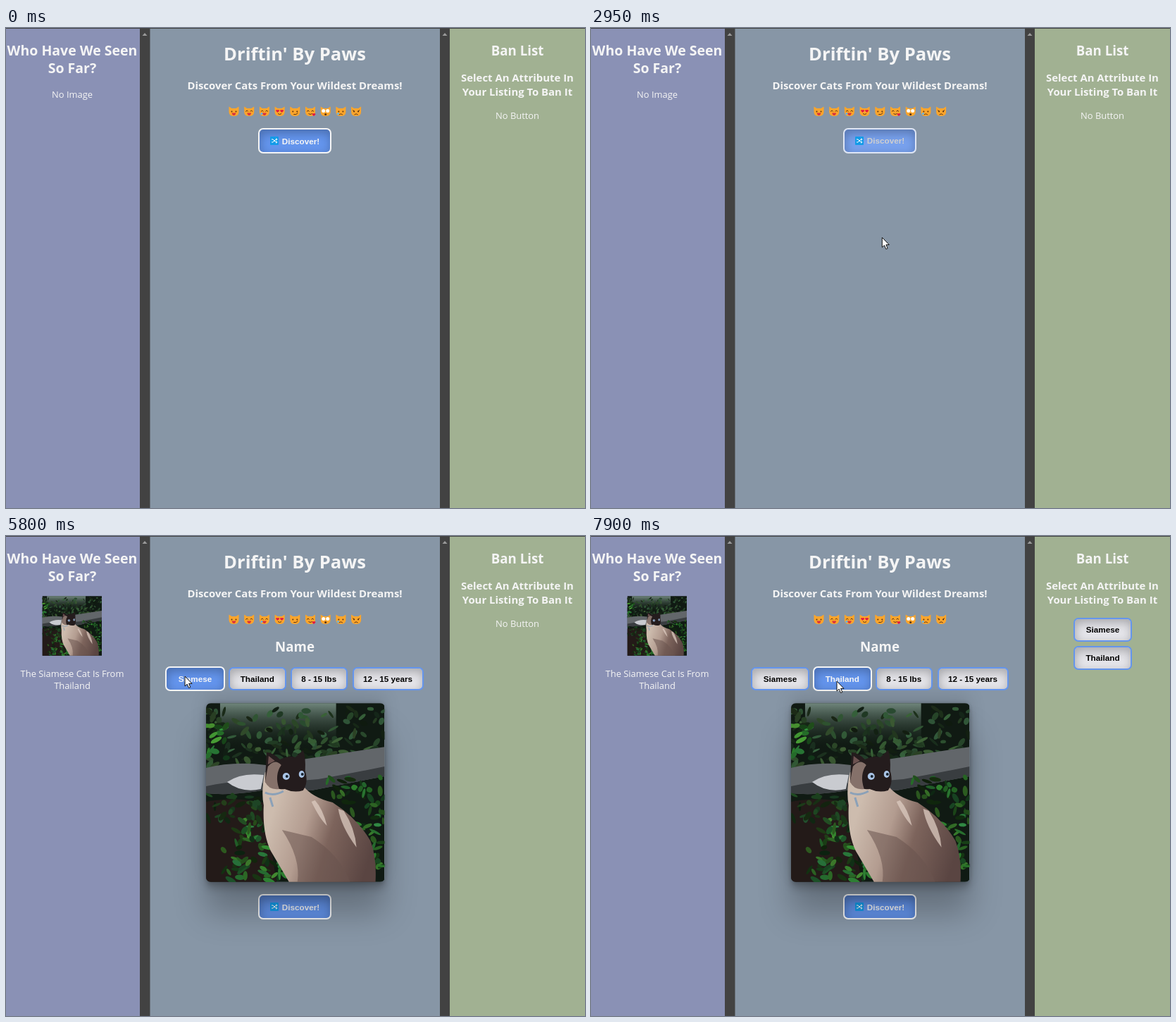
Animation, 822 px wide and 681 px high, one loop 8000 ms. Source, as an HTML page:

```html
<!DOCTYPE html>
<html lang="en">
<head>
<meta charset="utf-8">
<title>Cat discovery</title>
<style>
html, body { margin: 0; width: 100%; height: 100%; overflow: hidden; background: #8796a6; }
svg, .btn, #photo { position: absolute; }
#page { left: 0; top: 0; }
text { font-family: "Open Sans", "Noto Sans", sans-serif; fill: #f5f5f5; text-anchor: middle; }
.h { font-weight: 700; }
.btn {
  box-sizing: border-box; display: flex; align-items: center; justify-content: center; gap: 5px;
  border: 2px solid; border-radius: 7px; white-space: nowrap;
  font: 700 11.7px "Liberation Sans", Arial, sans-serif;
  box-shadow: inset 1px 5px 14px rgba(0, 0, 0, .27);
}
.btn svg { position: static; }
#photo {
  left: 284px; top: 237px; width: 253.5px; height: 254px; border-radius: 7px;
  box-shadow: rgba(0,0,0,.25) 0 44px 45px, rgba(0,0,0,.12) 0 -10px 24px, rgba(0,0,0,.12) 0 3px 5px,
    rgba(0,0,0,.17) 0 10px 11px, rgba(0,0,0,.09) 0 -2px 4px;
}
#photo svg { width: 100%; height: 100%; border-radius: 7px; }
</style>
</head>
<body>
<svg id="page" width="822" height="681">
  <defs>
    <linearGradient id="fur" x1="0" y1=".3" x2="1" y2=".6">
      <stop offset=".1" stop-color="#cdbcae"/><stop offset=".4" stop-color="#b39c90"/>
      <stop offset=".62" stop-color="#7d645c"/><stop offset="1" stop-color="#5a4542"/>
    </linearGradient>
    <linearGradient id="haze" x1="0" y1="0" x2="0" y2="1">
      <stop offset="0" stop-color="#6f857b"/><stop offset="1" stop-color="#1b2c20" stop-opacity="0"/>
    </linearGradient>
    <symbol id="cat" viewBox="0 0 254 254">
      <rect width="254" height="254" fill="#101a13"/>
      <rect x="20" width="165" height="62" fill="url(#haze)"/>
      <g id="ivy"></g>
      <path d="M0 92Q40 82 85 88L150 78Q200 70 254 62V104Q200 114 150 124L90 122Q40 132 0 128Z" fill="#62666a"/>
      <path d="M0 118Q45 108 85 114L160 108Q205 100 254 90V104Q200 114 150 124L90 122Q40 132 0 128Z" fill="#393d40"/>
      <path d="M30 112Q50 98 82 102L78 122Q50 128 30 112Z" fill="#c9cbd0"/>
      <path d="M0 140Q40 132 84 142L100 254H0Z" fill="#231a18"/>
      <g id="bush"></g>
      <path d="M84 98Q78 125 82 145Q80 185 92 210Q105 232 118 254H241Q243 220 234 196Q216 164 180 141Q150 134 137 116Z" fill="url(#fur)"/>
      <path d="M108 180Q135 220 130 254H205Q190 215 150 190Z" fill="#6b544f" opacity=".55"/>
      <path d="M188 150Q192 175 214 205Q212 178 196 153ZM150 140Q162 165 172 174Q166 150 155 138Z" fill="#dccbc0" opacity=".75"/>
      <path d="M84 112L86 70Q95 70 105 80Q118 74 127 77L138 67Q142 76 141 96Q146 113 138 124Q125 128 112 122Q95 124 84 112Z" fill="#241c1d"/>
      <path d="M88 90Q98 78 107 88Q97 102 104 122Q90 124 84 112Z" fill="#85716a"/>
      <path d="M88 87L89 75L98 82Z" fill="#6c5250"/>
      <path d="M84 127Q96 133 110 125M91 134L95 147" fill="none" stroke="#8ba1b8" stroke-width="3"/>
      <g fill="#a9c4e6"><ellipse cx="114" cy="104" rx="5" ry="5"/><ellipse cx="136" cy="101" rx="4" ry="5"/></g>
      <g fill="#17232f"><circle cx="115" cy="104" r="2"/><circle cx="137" cy="101" r="2"/></g>
    </symbol>
  </defs>
  <rect width="822" height="681" fill="#424242"/>
  <path d="M0 1H190V681H0Z" fill="#8a91b5"/>
  <path d="M204.5 1H616V681H204.5Z" fill="#8796a6"/>
  <path d="M630 1H822V681H630Z" fill="#a1b192"/>
  <path d="M193.5 11L197 7L200.5 11ZM619.500 11L623 7L626.500 11Z" fill="#9a9a9a"/>
  <g class="h" font-size="19.500">
    <text x="94" y="39">Who Have We Seen</text>
    <text x="94" y="64">So Far?</text>
    <text x="726" y="39" font-size="18.700">Ban List</text>
    <text x="410" y="164" font-size="18.700" data-show="3770 8000">Name</text>
    <text x="410" y="46" font-size="25.600">Driftin' By Paws</text>
  </g>
  <g class="h" font-size="14.900">
    <text x="410" y="87">Discover Cats From Your Wildest Dreams!</text>
    <text x="726" y="76">Select An Attribute In</text>
    <text x="726" y="95.500">Your Listing To Ban It</text>
  </g>
  <g font-size="12.900">
    <text x="94" y="99" data-show="0 3770">No Image</text>
    <text x="726" y="128.500" data-show="0 6130">No Button</text>
    <g data-show="3770 8000">
      <text x="94" y="200">The Siamese Cat Is From</text>
      <text x="94" y="217">Thailand</text>
    </g>
  </g>
  <g id="faces"></g>
  <use href="#cat" x="51.500" y="85" width="84.500" height="85" data-show="3970 8000"/>
</svg>
<div id="photo" data-show="3770 8000"><svg data-show="3970 8000"><use href="#cat" width="253.500" height="254"/></svg></div>
<svg id="cursor" width="14" height="20" style="left:0;top:0;overflow:visible">
  <path d="M0 0V14L3.200 11.200L5.500 16.500L7.800 15.500L5.600 10.400H10Z" fill="#fff" stroke="#111" stroke-width="1"/>
</svg>
<script>
const $ = id => document.getElementById(id);
const clamp = v => Math.max(0, Math.min(1, v));
const ramp = (t, a, b) => clamp((t - a) / (b - a));
const mix = (a, b, u) => `rgb(${a.map((v, i) => v + (b[i] - v) * u)})`;

// Foliage
let seed = 7;
const rnd = (a, b) => a + (b - a) * ((seed = seed * 16807 % 2147483647) / 2147483647);
const leaves = (n, x0, y0, x1, y1, sat, light) => {
  let s = '';
  for (let i = 0; i < n; i++) {
    const x = rnd(x0, x1), y = rnd(y0, y1);
    s += `<ellipse cx="${x}" cy="${y}" rx="${rnd(4, 9)}" ry="${rnd(1.5, 4)}" transform="rotate(${rnd(0, 180)} ${x} ${y})"
      fill="hsl(${rnd(105, 135)} ${sat}% ${rnd(8, light)}%)"/>`;
  }
  return s;
};
$('ivy').innerHTML = leaves(170, 0, 8, 254, 95, 28, 30) + leaves(14, 0, 25, 32, 80, 50, 42);
$('bush').innerHTML = leaves(70, 25, 165, 115, 254, 48, 38) + leaves(30, 0, 130, 80, 170, 40, 24)
  + leaves(100, 165, 105, 254, 235, 48, 36);

// Row of cat faces: [eyes, mouth, extra]
const dots = '<circle cx="-3" r="1"/><circle cx="3" r="1"/>';
const line = (d, c = '#5a3312') => `<path d="${d}" fill="none" stroke="${c}"/>`;
const heart = (x, y) => `<path transform="translate(${x} ${y})" d="M0 2.500L-2.500 0Q-2-2.500 0-1Q2-2.500 2.500 0Z" fill="#e3173e"/>`;
const grin = '<path d="M-3 2H3Q2 5.500 0 5.500T-3 2Z" fill="#d9323c"/>';
const shut = line('M-5 0L-3-1.500L-1.500 0M1.500 0L3-1.500L5 0');
const smile = line('M-2.500 3Q0 5 2.500 3');
const frown = line('M-2.500 4.500Q0 2 2.500 4.500');
const tear = '<circle cx="-4" cy="3" r="1.500" fill="#5bb5ee"/>';
$('faces').innerHTML = [
  dots + grin, shut + grin, shut + grin + tear, heart(-3, -1) + heart(3, -1) + smile,
  dots + line('M-2 4Q2 5 4 2'), shut + smile + heart(5, 4),
  '<g fill="#fff"><circle cx="-3" cy="-1" r="2.500"/><circle cx="3" cy="-1" r="2.500"/></g><circle cy="4" r="1.500"/>',
  dots + frown + tear, line('M-5-2L-2 0M5-2L2 0') + dots + frown
].map((face, i) => `<g transform="translate(${323.5 + 21.7 * i} 118.500)" fill="#5a3312">
  <path d="M-7-7L-3-4.500H3L7-7V1Q6.500 6.500 0 6.500T-7 1Z" fill="#fba52c"/>${face}</g>`).join('');

// Buttons
const SILVER = [229, 229, 234], BLUE = [100, 149, 237], WHITE = [245, 245, 245], BLACK = [0, 0, 0], DIM = [178, 180, 190];
const shuffle = `<svg width="12" height="12"><rect width="12" height="12" rx="1" fill="#139be8"/>
  <path d="M2 4H4L8 8H10M2 8H4L8 4H10M8.500 2.500L10 4L8.500 5.500M8.500 6.500L10 8L8.500 9.500" fill="none" stroke="#fff"/></svg>`;
const button = (label, x, y, w, h, show) => {
  const el = document.createElement('div');
  el.className = 'btn';
  el.innerHTML = label;
  if (show) el.dataset.show = show;
  $('photo').before(el);
  // Blue fill with a white rim at u = 1, silver with a blue rim at u = 0
  return (u, dy = 0, dim = 0, opacity = 1) => {
    const inset = 1 - u;
    Object.assign(el.style, {
      left: x + inset + 'px', top: y + dy + inset + 'px',
      width: w - 2 * inset + 'px', height: h - 2 * inset + 'px',
      backgroundColor: mix(SILVER, BLUE, u), borderColor: mix(BLUE, WHITE, u),
      color: dim ? mix(WHITE, DIM, dim) : mix(BLACK, WHITE, u), opacity
    });
  };
};
const listed = '3770 8000';
const discover = button(shuffle + 'Discover!', 358, 142, 104, 36);
const breed = button('Siamese', 226, 185, 85, 35, listed);
const origin = button('Thailand', 314.5, 185, 84.5, 35, listed);
button('8 - 15 lbs', 402.5, 185, 83.5, 35, listed)(0);
button('12 - 15 years', 490.5, 185, 103, 35, listed)(0);
button('Siamese', 684, 114.5, 85, 36, '6130 8000')(0);
button('Thailand', 684, 154.5, 85, 36, '7830 8000')(0);

// Pointer moves: start, end, steps, evenly timed points
const moves = [
  [110, 460, 6, [[754, 686], [579, 418]]],
  [990, 1730, 12, [[579, 418], [567, 370], [540, 290], [500, 243], [474, 222], [455, 195], [401, 148]]],
  [2210, 2410, 3, [[401, 148], [414, 160]]],
  [2610, 3020, 7, [[414, 160], [413, 352]]],
  [5030, 5800, 12, [[413, 352], [254, 199]]],
  [6660, 7410, 12, [[254, 199], [298, 205], [341, 218], [388, 325], [397, 345], [360, 270], [341, 223]]],
  [7480, 7900, 7, [[341, 223], [349, 206], [349, 206]]]
];
const pointer = t => {
  const move = moves.findLast(m => m[0] <= t);
  if (!move) return null;
  const [a, b, steps, pts] = move;
  const step = Math.min(steps, Math.floor((t - a) / (b - a) * (steps - 1) + 1e-6) + 1);
  const s = step / steps * (pts.length - 1);
  const i = Math.min(Math.floor(s), pts.length - 2);
  return pts[i].map((v, k) => v + (pts[i + 1][k] - v) * (s - i));
};

const timed = [...document.querySelectorAll('[data-show]')].map(el => [el, ...el.dataset.show.split(' ').map(Number)]);
const draw = now => {
  const t = now % 8000;
  for (const [el, a, b] of timed) el.style.display = t >= a && t < b ? '' : 'none';
  discover(1 - ramp(t, 1670, 1940) + ramp(t, 2680, 3000), t < 3770 ? 0 : 366);
  const back = ramp(t, 6990, 7200);
  breed(ramp(t, 5600, 5800) - back, 0, back ? 0 : ramp(t, 6100, 6260), 1 - .28 * (ramp(t, 6630, 6860) - back));
  origin(ramp(t, 7450, 7680));
  const p = pointer(t);
  $('cursor').style.display = p ? '' : 'none';
  if (p) $('cursor').style.transform = `translate(${p[0]}px, ${p[1]}px)`;
  requestAnimationFrame(draw);
};
draw(performance.now());
</script>
</body>
</html>
```
